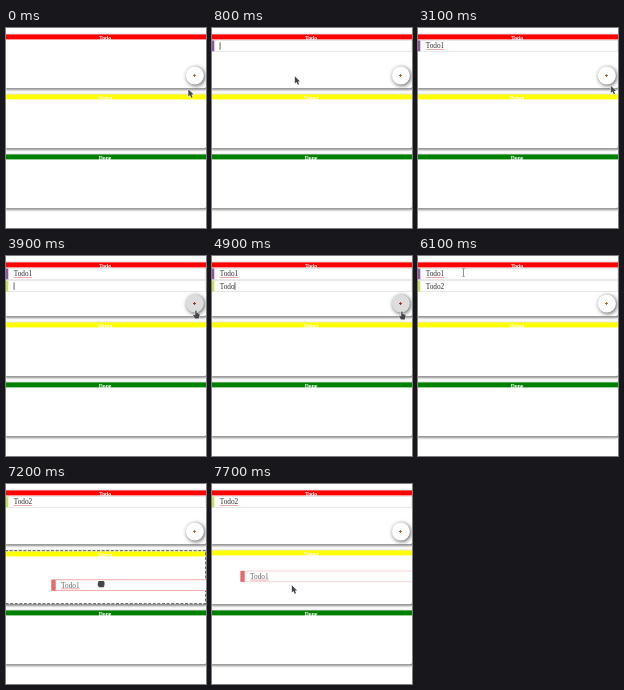
Recreate the animation shown at these times as an HTML page with a canvas. Size 200 by 200 pixels, loop 8000 ms.

```html
<!DOCTYPE html>
<html lang="en">
<head>
<meta charset="utf-8">
<title>Todo board</title>
<style>
html, body { margin: 0; width: 100%; height: 100%; overflow: hidden; background: #fff; }
canvas { display: block; width: 100%; height: 100%; }
</style>
</head>
<body>
<canvas></canvas>
<script>
const LOOP = 8000, TICK = 100;
const canvas = document.querySelector('canvas');
const ctx = canvas.getContext('2d');
let scale = 1;

// Pointer path: time, x, y, shape used from that time on
const pointerPath = [
  [0, 182, 61, 'arrow'], [100, 185, 54, 'hand'], [200, 188, 50, 'hand'], [300, 158, 50, 'arrow'],
  [400, 115, 48, 'arrow'], [500, 82.5, 47.5, 'arrow'], [700, 82, 48, 'arrow'], [900, 83, 48, 'arrow'],
  [2500, 83, 48, 'arrow'], [2700, 108, 49, 'arrow'], [3000, 187, 56, 'arrow'], [3100, 192.5, 57.5, 'arrow'],
  [3300, 192.5, 57.5, 'arrow'], [3400, 191, 54, 'hand'], [3900, 190, 54, 'hand'], [4600, 190, 54.5, 'hand'],
  [4700, 190, 55, 'hand'], [5500, 190, 55, 'hand'], [5600, 160, 50, 'arrow'], [5700, 110, 38, 'arrow'],
  [5800, 50, 24, 'arrow'], [5900, 4, 6, 'arrow'], [6000, 32, 15, 'beam'], [6100, 45.5, 16.5, 'beam'],
  [6300, 51, 16.5, 'beam'], [6500, 52.5, 16.5, 'beam'], [6600, 53, 17, 'beam'], [6800, 53, 17, 'beam'],
  [6900, 53, 17, 'grab'], [7000, 60, 36, 'grab'], [7100, 80, 72, 'grab'], [7200, 95, 100, 'grab'],
  [7300, 92, 98, 'grab'], [7400, 84, 94, 'grab'], [7500, 82, 93.5, 'beam'], [7600, 82, 93.5, 'beam'],
  [7700, 79.5, 101, 'arrow'], [LOOP, 79.5, 101, 'arrow']
];

const sections = [['Todo', 'red', 6], ['Doing', 'yellow', 66], ['Done', 'green', 126]];

function pointerAt(t) {
  const i = pointerPath.findIndex(p => p[0] > t);
  const [t0, x0, y0, shape] = pointerPath[i - 1], [t1, x1, y1] = pointerPath[i];
  const k = (t - t0) / (t1 - t0);
  return { x: x0 + (x1 - x0) * k, y: y0 + (y1 - y0) * k, shape };
}

// Text after the latest of the given [time, text] steps
const typed = (t, steps) => steps.reduce((text, [at, next]) => t >= at ? next : text, '');

function rect(x, y, w, h, color) {
  ctx.fillStyle = color;
  ctx.fillRect(x, y, w, h);
}

function withShadow(blur, color, draw) {
  ctx.save();
  ctx.shadowColor = color;
  ctx.shadowBlur = blur * scale;
  ctx.shadowOffsetX = ctx.shadowOffsetY = scale;
  draw();
  ctx.restore();
}

function drawSection([title, color, y], isDropTarget) {
  withShadow(3, '#444', () => {
    ctx.fillStyle = '#fff';
    ctx.beginPath();
    ctx.roundRect(-2, y + 0.4, 202.5, 53.8, [0, 0, 3, 0]);
    ctx.fill();
  });
  // The dashed border pushes the header down
  const top = y + (isDropTarget ? 1.4 : 0.4);
  rect(0, top, 200, 5, color);
  ctx.font = 'bold 5.7px "Liberation Serif", serif';
  ctx.textAlign = 'center';
  ctx.fillStyle = '#fff';
  ctx.fillText(title, 99, top + 6);
  if (isDropTarget) {
    ctx.strokeStyle = '#555';
    ctx.setLineDash([3, 1.6]);
    ctx.strokeRect(-1, y + 0.7, 200.7, 53);
    ctx.setLineDash([]);
  }
}

function drawButton(hover) {
  withShadow(4, '#555', () => {
    ctx.fillStyle = hover ? '#ddd' : '#fff';
    ctx.beginPath();
    ctx.arc(188.9, 47.6, 9, 0, 7);
    ctx.fill();
  });
  const color = hover ? '#a03428' : '#b5702c';
  rect(187, 47, 3, 1, color);
  rect(188, 46, 1, 3, color);
}

function drawItem({ x = -2, y, text, color, border = '#ddd', ink = '#333', caret, underline }) {
  rect(x, y, 203, 11.5, '#fff');
  ctx.strokeStyle = border;
  ctx.lineWidth = 0.7;
  ctx.strokeRect(x + 0.5, y + 0.5, 201.3 - Math.max(x, 0), 10.8);
  ctx.lineWidth = 1;
  rect(x, y + 0.5, 4.3, 10.8, color);
  ctx.font = '7.3px "Liberation Serif", serif';
  ctx.textAlign = 'left';
  ctx.fillStyle = ink;
  ctx.fillText(text, x + 9.7, y + 8.3);
  const width = ctx.measureText(text).width;
  if (caret) rect(x + 9.7 + width, y + 2.2, 0.7, 7.5, '#222');
  if (underline) rect(x + 9.7, y + 9.2, width, 0.7, '#e08c8c');
}

function outline(points) {
  ctx.beginPath();
  points.forEach(([x, y]) => ctx.lineTo(x, y));
  ctx.closePath();
  ctx.strokeStyle = '#fff';
  ctx.lineWidth = 0.9;
  ctx.stroke();
  ctx.fillStyle = '#44464e';
  ctx.fill();
  ctx.lineWidth = 1;
}

const pointerShapes = {
  arrow() {
    outline([[0.3, 0.3], [0.3, 7.6], [2, 6.1], [3.3, 8.8], [4.6, 8.2], [3.4, 5.6], [5.6, 5.5]]);
  },
  hand() {
    outline([[-0.8, 0.5], [0.6, 0.5], [0.7, 3], [3.6, 3.8], [3.5, 6.2], [2.7, 8.4], [-1, 8.4], [-3, 5.2], [-2.2, 4.6], [-0.8, 5.6]]);
  },
  grab() {
    outline([[-2.5, -2.9], [2.8, -3], [3.5, -1.6], [3.4, 1.8], [2.6, 3.2], [-2, 3.2], [-3.4, 1], [-3.2, -0.6]]);
  },
  beam() {
    rect(-0.4, -4.2, 0.8, 8.4, '#777');
    rect(-1.5, -4.4, 3, 0.7, '#999');
    rect(-1.5, 3.7, 3, 0.7, '#999');
  }
};

function drawScene(t) {
  const pointer = pointerAt(t);
  const dragging = pointer.shape === 'grab';
  const moved = t >= 6900;
  const dropTarget = dragging ? (pointer.y < 63 ? 'Todo' : 'Doing') : '';
  const first = typed(t, [[1100, 'T'], [1500, 'Tod'], [1700, 'Todo'], [2000, 'Todo1']]);
  const second = typed(t, [[4300, 'T'], [4600, 'Tod'], [4800, 'Todo'], [5300, 'Todo2']]);

  rect(0, 0, 200, 200, '#fff');
  sections.forEach(section => drawSection(section, section[0] === dropTarget));

  if (t >= 3600) drawItem({
    y: moved ? 12 : 24.2, text: second, color: '#c4e05c',
    caret: t < 5600, underline: moved
  });
  if (t >= 300 && !moved) drawItem({
    y: 12, text: first, color: '#9154a0',
    caret: t >= 700 && t < 2600, underline: t >= 2600
  });
  drawButton(pointer.shape === 'hand');

  if (moved) drawItem({
    x: dragging ? pointer.x - 49.6 : 28.4, y: dragging ? pointer.y - 4.7 : 86.5,
    text: first, color: '#e56a6a', ink: '#666', underline: true,
    border: dragging ? '#f08a8a' : '#f0c4c4'
  });

  ctx.save();
  ctx.translate(pointer.x, pointer.y);
  pointerShapes[pointer.shape]();
  ctx.restore();
}

function frame(now) {
  const size = Math.round(innerWidth * devicePixelRatio);
  if (canvas.width !== size) canvas.width = canvas.height = size;
  scale = size / 200;
  ctx.setTransform(scale, 0, 0, scale, 0, 0);
  drawScene(Math.floor(now % LOOP / TICK) * TICK);
  requestAnimationFrame(frame);
}
frame(0);
</script>
</body>
</html>
```
